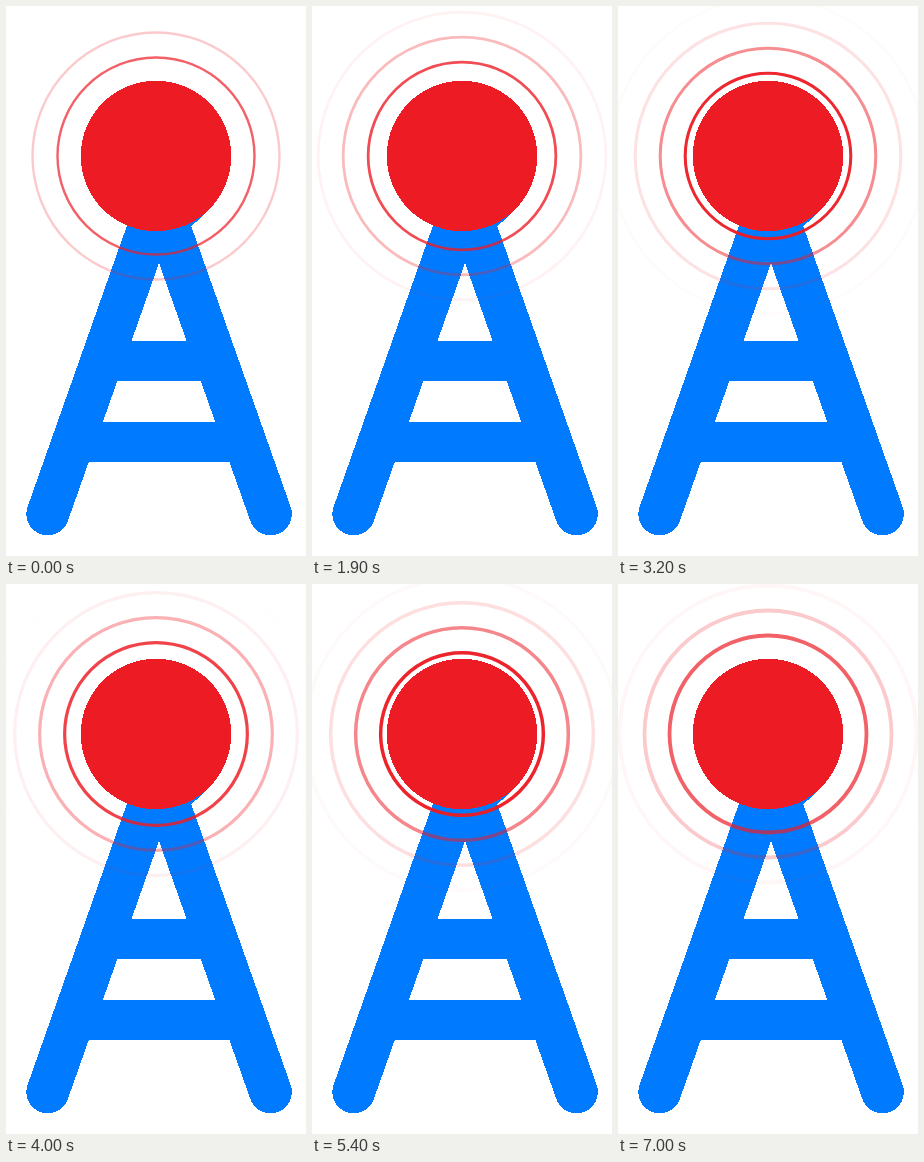
These frames come from a looping animation (300 by 550 pixels, 7030 ms). An HTML page:

```html
<!DOCTYPE html>
<html lang="en">
<head>
<meta charset="utf-8">
<title>Broadcast tower</title>
<style>
  html, body { margin: 0; width: 100%; height: 100%; overflow: hidden; background: #fff; }
  svg { display: block; }
</style>
</head>
<body>
<svg width="300" height="550" viewBox="0 0 300 550" fill="none">
  <g shape-rendering="crispEdges">
    <g stroke="#007bff">
      <path d="M41.7 508L153 193L264.5 508" stroke-width="42.7" stroke-linecap="round"/>
      <path d="M100 355H206M72 435.75H234" stroke-width="40"/>
    </g>
    <path d="M170 190L200 206L190 216L185 220Z" fill="#007bff"/>
    <circle cx="150" cy="150" r="75.3" fill="#ed1c24"/>
  </g>
  <g id="rings" stroke="#ed1c24">
    <circle cx="150" cy="150"/>
    <circle cx="150" cy="150"/>
    <circle cx="150" cy="150"/>
    <circle cx="150" cy="150"/>
    <circle cx="150" cy="150"/>
  </g>
</svg>
<script>
  const LOOP = 7030, STEP = 100;
  const PERIOD = 7000 / 3;        // ms between two rings
  const START_RADIUS = 73.5, SPACING = 25;
  const group = document.getElementById('rings');
  const rings = [...group.children];

  function draw(now) {
    const time = Math.floor((now % LOOP) / STEP) * STEP;
    group.setAttribute('stroke-width', 2.4 + 0.2 * time / 1000);
    rings.forEach((ring, i) => {
      // Two rings are already on their way when the loop begins.
      const age = time / PERIOD + 2 - i;
      ring.setAttribute('r', Math.max(0, START_RADIUS + SPACING * age));
      ring.setAttribute('stroke-opacity', age < 0 ? 0 : Math.exp(-((age / 1.65) ** 2)));
    });
  }

  const begin = performance.now();
  function tick() {
    draw(performance.now() - begin);
    requestAnimationFrame(tick);
  }
  tick();
</script>
</body>
</html>
```
